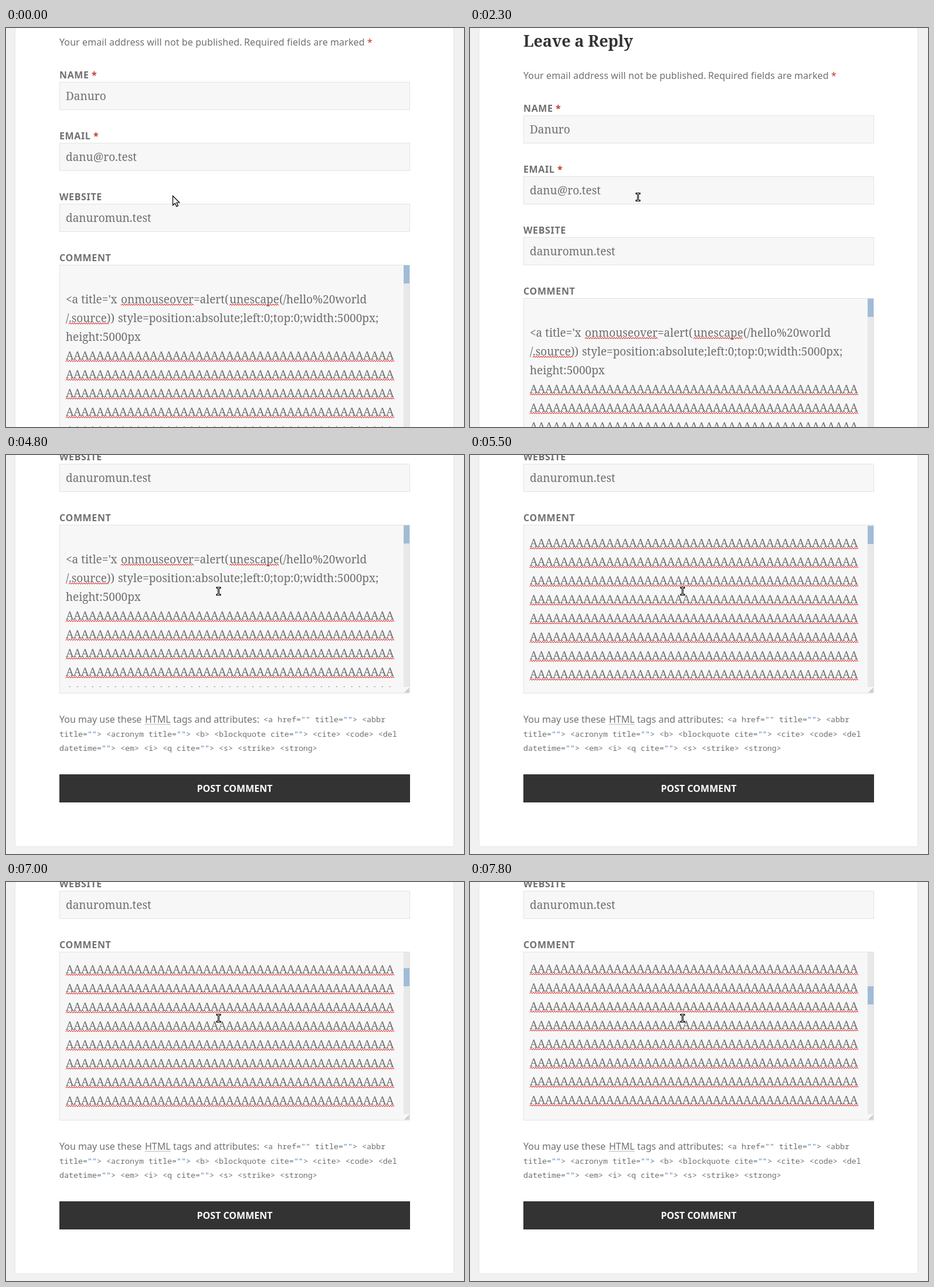
These frames come from a looping animation (781x681 px, 8 s). An HTML page:

```html
<!DOCTYPE html>
<html lang="en">
<head>
<meta charset="utf-8">
<title>Comment form</title>
<style>
  html, body { margin: 0; width: 100%; height: 100%; overflow: hidden; background: #f1f1f1; }
  svg { display: block; width: 100%; height: 100%; }
  text { fill: #707070; white-space: pre; }
  .sans { font: 16px "Noto Sans", sans-serif; }
  .note { letter-spacing: .1px; }
  .bold { font: bold 16px "Noto Sans", sans-serif; }
  .label { font: bold 16px "Noto Sans", sans-serif; letter-spacing: .04em; }
  .serif { font: 19px "Noto Serif", serif; fill: #6e6e6e; }
  .title { font: bold 27px "Noto Serif", serif; fill: #333; letter-spacing: -.12px; }
  .code { font: 13.33px "Noto Sans Mono", monospace; }
  .quote { fill: #5583b3; }
  .star { fill: #c0392b; }
  .wave { fill: none; stroke: #e01010; stroke-width: 1; }
  .box { fill: #f7f7f7; stroke: #e3e3e3; }
</style>
</head>
<body>
<svg id="stage" viewBox="0 0 781 681" xmlns="http://www.w3.org/2000/svg"></svg>
<script>
const LOOP = 8000, STEP = 100;
const LINE = 32, HEAD_ROWS = 4, SLOTS = 10;
const AREA_TOP = 632, FIRST_BASE = 666;   // page coordinates
const THUMB_RATIO = 201;                  // scrolled pixels per thumb pixel

const esc = s => s.replace(/&/g, "&amp;").replace(/</g, "&lt;");
const text = (x, y, s, cls, extra = "") =>
  `<text x="${x}" y="${y}" class="${cls}" ${extra}>${esc(s)}</text>`;
const rect = (x, y, w, h, fill) =>
  `<rect x="${x}" y="${y}" width="${w}" height="${h}" fill="${fill}"/>`;
const box = (y, h) => `<rect x="91.5" y="${y + .5}" width="597" height="${h - 1}" class="box"/>`;
const wave = (x1, x2, base) =>
  `<path class="wave" d="M${x1} ${base + 3.5}${"l2-2.5l2 2.5".repeat(Math.round((x2 - x1) / 4))}"/>`;

function field(y, name, value, starX) {
  return text(91, y - 6, name, "label")
    + (starX ? text(starX, y - 6, "*", "label star") : "")
    + box(y, 48) + text(102, y + 31, value, "serif");
}

function code(x, y, s) {
  const body = esc(s).replace(/""/g, '<tspan class="quote">""</tspan>');
  return `<text x="${x}" y="${y}" class="code">${body}</text>`;
}

// Each part: [x, text, end of its spelling mark]
function headLines() {
  const rows = [
    [],
    [[102, "<a title='x"], [196, "onmouseover", 320], [320, "=alert("],
     [381, "unescape", 466], [466, "(/hello%20world"]],
    [[102, "/"], [107, ".source", 173], [172, "))"],
     [191, "style=position:absolute;left:0;top:0;width:5000px;"]],
    [[102, "height:5000px"]]
  ];
  return rows.map((parts, i) => {
    const y = FIRST_BASE + i * LINE;
    return parts.map(([x, s, end]) =>
      (end ? wave(x, end, y) : "") + text(x, y, s, "serif")).join("");
  }).join("");
}

function fillRows() {
  const count = 43, pitch = 13;
  const xs = Array.from({ length: count }, (_, i) => 102 + i * pitch).join(" ");
  return Array.from({ length: SLOTS }, (_, i) => {
    const y = FIRST_BASE + i * LINE;
    return `<g class="row">${text(xs, y, "A".repeat(count), "serif")}${wave(102, 661, y)}</g>`;
  }).join("");
}

function commentArea() {
  let grip = "";
  for (let i = 0; i < 4; i++) grip += `M${680 + i * 2} 918.5L687.5 ${911 + i * 2}`;
  return text(91, AREA_TOP - 6, "COMMENT", "label") + box(AREA_TOP, 288)
    + `<g clip-path="url(#pane)"><g id="head">${headLines()}</g><g id="rows">${fillRows()}</g></g>`
    + rect(678, 633, 10, 276, "#e8e8e8")
    + `<rect id="thumb" x="678" y="633" width="10" height="31" fill="#a0bcd6"/>`
    + `<path d="${grip}" stroke="#999" fill="none" stroke-width=".9"/>`;
}

function notes() {
  return text(91, 970, "You may use these", "sans") + text(237, 970, "HTML", "sans")
    + `<path d="M237 972.5H281" stroke="#707070" stroke-dasharray="1 1"/>`
    + text(285, 970, "tags and attributes:", "sans")
    + code(439, 969, '<a href="" title=""> <abbr')
    + code(91, 994, 'title=""> <acronym title=""> <b> <blockquote cite=""> <cite> <code> <del')
    + code(91, 1018, 'datetime=""> <em> <i> <q cite=""> <s> <strike> <strong>');
}

const stage = document.getElementById("stage");
const beam = "M-2.5-6H2.5M0-6V6M-2.5 6H2.5";
stage.innerHTML =
  `<defs><clipPath id="pane"><rect x="92" y="643" width="586" height="266"/></clipPath></defs>`
  + rect(0, 0, 781, 681, "#f1f1f1")
  + `<g id="page">`
  + `<rect x="15.5" y="-20.5" width="748" height="1202" fill="#fff" stroke="#e6e6e6"/>`
  + rect(91, -5, 52, 52, "#333")
  + `<rect x="91.5" y="79.5" width="78" height="31" fill="#fff" stroke="#ebebeb"/>`
  + text(130.5, 101, "REPLY", "bold", 'text-anchor="middle"')
  + rect(91, 143, 598, 1, "#ebebeb")
  + text(91, 203, "Leave a Reply", "title")
  + text(91, 258, "Your email address will not be published.", "sans note")
  + text(406, 258, "Required fields are marked", "sans note")
  + text(616, 258, "*", "sans star")
  + field(320, "NAME", "Danuro", 146)
  + field(424, "EMAIL", "danu@ro.test", 149)
  + field(528, "WEBSITE", "danuromun.test")
  + commentArea() + notes()
  + rect(91, 1058, 598, 48, "#333")
  + text(390, 1088, "POST COMMENT", "bold", 'text-anchor="middle" style="fill:#fff"')
  + `</g>`
  + `<path id="arrow" d="M.5.5V16.5L4.2 13L6.8 18.6L9.4 17.4L6.9 12H11.8Z" fill="#fff" stroke="#000" stroke-width="1.2"/>`
  + `<g id="beam" fill="none"><path d="${beam}" stroke="#000" stroke-width="3" stroke-linecap="square"/>`
  + `<path d="${beam}" stroke="#fff" stroke-width=".9"/></g>`;

// Bursts of wheel motion: [start, steps, end value]
const pageBursts = [[1000, 4, 0], [2000, 4, 171], [3300, 3, 513]];
const areaBursts = [[5200, 4, 220], [5700, 1, 223], [6100, 2, 1407], [6400, 2, 1600],
  [6800, 5, 7995], [7400, 5, 11710]];

// Pointer poses: [time, kind, x, y]
const poses = [[0, "arrow", 284, 286], [2300, "beam", 286.5, 288.5], [3800, "beam", 287.5, 292.5],
  [3900, "beam", 287.5, 290.5], [4200, "beam", 300.5, 250.5], [4300, "", 0, 0],
  [4600, "arrow", 395, 103], [4700, "beam", 373.5, 178.5], [4800, "beam", 362.5, 232.5]];

function scrolled(bursts, from, t) {
  let value = from;
  for (const [start, steps, end] of bursts) {
    if (t < start) break;
    const done = Math.min(steps, Math.floor((t - start) / STEP) + 1);
    value += (end - value) * done / steps;
  }
  return Math.round(value);
}

const $ = id => document.getElementById(id);
const move = (el, x, y) => el.setAttribute("transform", `translate(${x} ${y})`);
const page = $("page"), head = $("head"), rows = $("rows"), thumb = $("thumb");
const slots = [...rows.children];
const pointers = { arrow: $("arrow"), beam: $("beam") };

function draw(t) {
  move(page, 0, -scrolled(pageBursts, 228, t));

  const top = scrolled(areaBursts, 0, t);
  const first = Math.floor(top / LINE);
  move(head, 0, -top);
  move(rows, 0, -(top % LINE));
  slots.forEach((slot, i) => {
    slot.style.display = first + i < HEAD_ROWS ? "none" : "";
  });
  thumb.setAttribute("y", 633 + Math.round(top / THUMB_RATIO));

  const [, kind, x, y] = poses.filter(p => p[0] <= t).pop();
  for (const name in pointers) {
    pointers[name].style.display = name === kind ? "" : "none";
    move(pointers[name], x, y);
  }
}

const began = performance.now();
function tick() {
  draw((performance.now() - began) % LOOP);
  requestAnimationFrame(tick);
}
tick();
</script>
</body>
</html>
```
